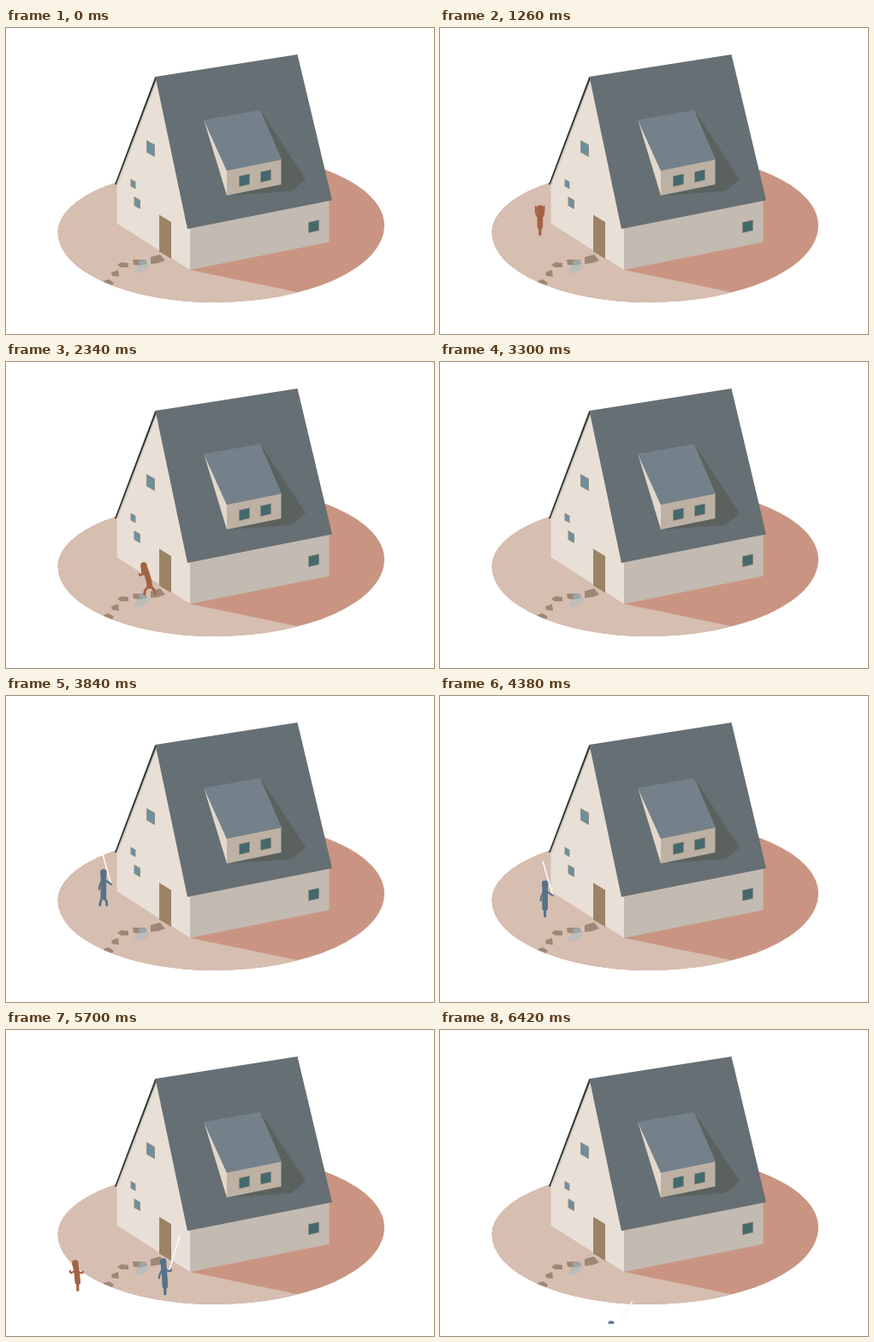
Write an HTML page that moves like this. It is 500x358 px and loops after 6.48 s.

```html
<!DOCTYPE html>
<html lang="en">
<head>
<meta charset="utf-8">
<title>House visit</title>
<style>
  html, body { margin: 0; width: 100%; height: 100%; overflow: hidden; background: #fff; }
  svg { display: block; width: 500px; height: 358px; }
</style>
</head>
<body>
<svg viewBox="0 0 500 358">
  <defs>
    <clipPath id="ground"><path d="M60.5 239A190 76 0 0 1 250 163V146A192 85 0 0 1 442 231A199 90 0 0 1 243 321A182.500 82 0 0 1 60.500 239Z"/></clipPath>
    <clipPath id="stage"><path d="M0 0H500V343.5H0Z"/></clipPath>
    <clipPath id="doorway"><path d="M0 0H193V343H0Z"/></clipPath>
  </defs>
  <g clip-path="url(#ground)">
    <path fill="#c99582" d="M0 100H500V358H0Z"/>
    <path fill="#d6beb1" d="M0 100H175L215 283L340 309L350 358H0Z"/>
    <g fill="#9c8875">
      <path d="M169 268L180 265L186 272L178 275L169 276Z"/>
      <path d="M148 271L163 271L165 276L160 278L149 277Z"/>
      <path d="M130 277L135 274L143 275L143 280L134 280Z"/>
      <path d="M123 286L131 283L132 291L124 290Z"/>
      <path d="M114 296L120 294L126 298L124 301L115 300Z"/>
    </g>
    <path fill="#bdbdba" d="M149 285L154 278L167 275L166 281L157 287Z"/>
    <path fill="#9ba6a9" d="M155 272L163 271L164 276L156 278Z"/>
  </g>
  <g id="behind" clip-path="url(#stage)"></g>
  <g id="house">
    <path fill="#e8dfd6" d="M175 58L129.500 183V228.500L215 283V235L212 234Z"/>
    <path fill="#c3bab1" d="M215 234L377.500 201V250.500L215 283Z"/>
    <path fill="#d5ccbf" d="M175 59L128.500 183H131L176 63Z"/>
    <path fill="#2e3937" d="M174.500 56.500L127 183L128.700 183.500L175.500 60Z"/>
    <path fill="#666f74" d="M174.500 57L340.500 31L381 201.500L212 235Z"/>
    <path fill="#5a615f" d="M297 96L350 177L333 191L258 196L300 150Z"/>
    <path fill="#e1d8cb" d="M231 107L258 167V196Z"/>
    <path fill="#bdb1a4" d="M258 166L321.500 153V183L258 196Z"/>
    <path fill="#74818a" d="M231 107.500L297 96L322 154L258 167Z"/>
    <path fill="#9b8465" d="M179 218.500L193 227V270L179 261.500Z"/>
  </g>
  <g id="front" clip-path="url(#stage)"></g>
</svg>
<script>
const LOOP = 6480, STEP = 60;
const RED = '#a36144', BLUE = '#56728a';
const byId = id => document.getElementById(id);
const mix = (a, b, u) => a + (b - a) * u;
const clamp = u => Math.min(1, Math.max(0, u));
const smooth = (from, to, u) => {
  const k = clamp((u - from) / (to - from));
  return k * k * (3 - 2 * k);
};

// Skewed window with a thin frame.
function pane(x, y, w, h, slope, glass) {
  const quad = (inset, fill) => {
    const a = x + inset, b = x + w - inset, top = y + inset, low = y + h - inset;
    return `<path fill="${fill}" d="M${a} ${top}L${b} ${top + slope}V${low + slope}L${a} ${low}Z"/>`;
  };
  return quad(0, '#9c9183') + quad(.8, glass);
}
const sidePane = (x, y) => pane(x, y, 13, 13, -2.8, '#44696d');
const gablePane = (x, y, w) => pane(x, y, w, w * 1.45, w * .55, '#6c909d');
byId('house').innerHTML +=
  sidePane(272, 173) + sidePane(297, 168) + sidePane(353, 227) +
  gablePane(164, 131, 10) + gablePane(145.5, 176.5, 6) + gablePane(149.5, 197, 7.5);

// Each walk is one Bezier curve for the feet, followed at even pace.
const walks = {
  visit: { start: 300, span: 2400, route: [[127, 223], [76, 216], [156, 293], [183, 268]] },
  hunt: { start: 3360, span: 3060, route: [[128, 228], [70, 278], [208, 243], [200, 384]] },
  escape: { start: 5160, span: 1260, route: [[186, 267], [60, 290], [50, 330], [104, 385]] }
};
const progress = (walk, t) => clamp((t - walk.start) / walk.span);
function along({ route: [a, b, c, d] }, u) {
  const v = 1 - u;
  return [0, 1].map(i => v ** 3 * a[i] + 3 * v * v * u * b[i] + 3 * v * u * u * c[i] + u ** 3 * d[i]);
}

const stroke = (d, width, color) =>
  `<path d="${d}" fill="none" stroke="${color}" stroke-width="${width}" stroke-linecap="round"/>`;

// Hands are offsets from the feet; the torso and head form one bent capsule.
function person([x, y], { color, tall, lean, stride, hands }) {
  const hip = y - 11, headX = x + lean, headY = y - tall + 4;
  const shoulderX = x + lean * .8, shoulderY = headY + 8;
  const leg = s => stroke(`M${x} ${hip}Q${x + s * 1.1} ${y - 7} ${x + s} ${y - 1.5}`, 2.8, color);
  const arm = ([hx, hy]) =>
    stroke(`M${shoulderX} ${shoulderY}Q${x + hx} ${shoulderY + 6} ${x + hx} ${y + hy}`, 2.2, color);
  return leg(stride) + leg(-stride) + hands.map(arm).join('')
    + stroke(`M${headX} ${headY}Q${x + lean * .2} ${mix(headY, hip, .55)} ${x} ${hip}`, 6.6, color)
    + stroke(`M${headX} ${headY}v1`, 7.4, color);
}

function visitor(t) {
  const u = progress(walks.visit, t);
  const turn = smooth(.45, .85, u);
  const [x, y] = along(walks.visit, u);
  const entering = Math.max(0, t - 2940) * .07;
  return person([x + entering, y], {
    color: RED, tall: mix(36, 39, turn), lean: -7 * turn,
    stride: 6 * Math.sin((Math.min(t, 2700) - 1260) / 480 * 2 * Math.PI),
    hands: [[mix(-5, -12, turn), mix(-34, -25, turn)], [mix(4.5, -9, turn), mix(-34, -31, turn)]]
  });
}

function hunter(t) {
  const u = progress(walks.hunt, t);
  const crouch = smooth(.33, .55, u), charge = smooth(.55, .85, u);
  const [x, y] = along(walks.hunt, u);
  const hand = [mix(9, 7, crouch), mix(-26, -30, crouch)];
  const angle = (-16 - 11 * crouch + 55 * charge) * Math.PI / 180;
  const [bx, by] = [x + hand[0] - 2 * crouch, y + hand[1]];
  const blade = stroke(`M${bx} ${by}L${bx + 41 * Math.sin(angle)} ${by - 41 * Math.cos(angle)}`, 1.7, '#faf6f3');
  return blade + person([x, y], {
    color: BLUE, tall: 44 - 2 * crouch * (1 - charge), lean: -11 * crouch * (1 - charge),
    stride: 4 * Math.sin((t - 4380) / 440 * 2 * Math.PI),
    hands: [hand, [-5 - 2 * crouch, -20]]
  });
}

function runaway(t) {
  return person(along(walks.escape, progress(walks.escape, t)), {
    color: RED, tall: 37, lean: -3,
    stride: 5.5 * Math.sin((t - walks.escape.start) / 360 * 2 * Math.PI),
    hands: [[-9, -24], [6, -23]]
  });
}

function draw(t) {
  let behind = '', front = '';
  if (t >= 300 && t <= 3240) {
    if (t < 1260) behind = visitor(t);
    else front = `<g clip-path="url(#doorway)">${visitor(t)}</g>`;
  }
  if (t >= walks.hunt.start) {
    if (t < 4200) behind = hunter(t);
    else front = hunter(t);
  }
  if (t >= walks.escape.start) front += runaway(t);
  byId('behind').innerHTML = behind;
  byId('front').innerHTML = front;
}

const began = performance.now();
let shown = -1;
function tick() {
  const t = Math.floor((performance.now() - began) % LOOP / STEP) * STEP;
  if (t !== shown) draw(shown = t);
  requestAnimationFrame(tick);
}
tick();
</script>
</body>
</html>
```
